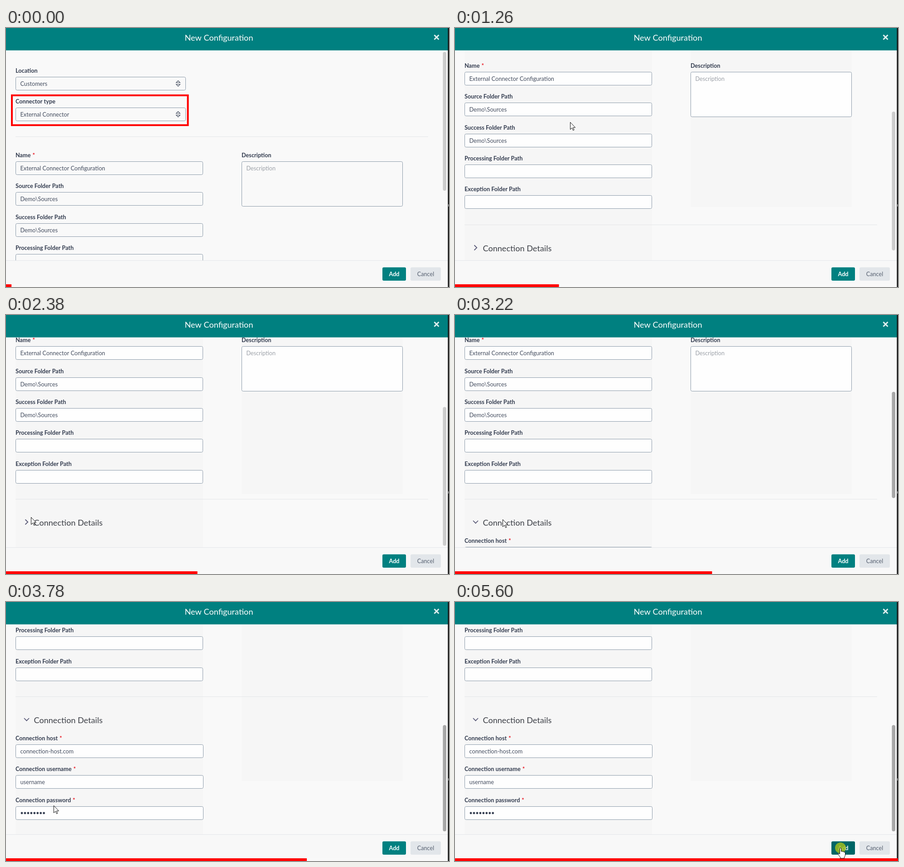
Write an HTML page with a canvas that moves like this. It is 978x573 px and loops after 5670 ms.

```html
<!DOCTYPE html>
<html lang="en">
<head>
<meta charset="utf-8">
<title>New Configuration</title>
<style>
html, body { margin: 0; width: 100%; height: 100%; overflow: hidden; background: #f9f9f9; }
canvas { display: block; }
</style>
</head>
<body>
<canvas id="stage" width="978" height="573"></canvas>
<script>
const W = 978, H = 573, STEP = 70, LOOP = 5670;
const ctx = document.getElementById('stage').getContext('2d');
const INK = '#454e60', LABEL = '#343d50', BORDER = '#8c9baa', TEAL = '#008080', RED = '#ff0000';

// Keyframes: [time, value...]
const SCROLL = [
  [840, 0], [910, 22.7], [980, 80], [1050, 99], [1120, 130], [1190, 178], [1260, 198],
  [1330, 198], [1400, 215], [1470, 225.7], [3290, 225.7], [3360, 260], [3430, 310],
  [3500, 324.3], [3570, 324.3], [3640, 345], [3710, 400], [3780, 423.5]
];
const POINTER = [
  [70, 815, 528], [140, 795, 515], [280, 620, 400], [420, 400, 275], [560, 265, 212], [630, 254, 208],
  [1820, 254, 208], [1890, 253, 214], [2030, 215, 265], [2170, 120, 380], [2310, 62, 440],
  [2380, 55, 447], [2450, 52, 455], [2800, 52, 455], [3080, 105, 452], [3500, 105, 452], [3780, 105, 450],
  [3850, 100, 452], [3990, 81, 455], [4130, 90, 450], [4270, 140, 436], [4410, 246, 424],
  [4480, 283, 420], [4550, 340, 414], [4620, 495, 404], [4690, 650, 418], [4760, 703, 424],
  [4830, 760, 449], [4900, 798, 470], [4970, 812, 487], [5040, 817, 490], [5180, 840, 532], [5320, 851, 544]
];
const OPEN = [[2590, 0], [2870, 1]];

function at(keys, t) {
  if (t <= keys[0][0]) return keys[0].slice(1);
  const i = keys.findIndex(k => k[0] >= t);
  if (i < 0) return keys[keys.length - 1].slice(1);
  const a = keys[i - 1], b = keys[i], u = (t - a[0]) / (b[0] - a[0]);
  return a.slice(1).map((v, j) => v + (b[j + 1] - v) * u);
}

function rect(x, y, w, h, color) {
  ctx.fillStyle = color;
  ctx.fillRect(x, y, w, h);
}

function rounded(x, y, w, h, r, fill, stroke) {
  ctx.beginPath();
  ctx.roundRect(x, y, w, h, r);
  ctx.fillStyle = fill;
  ctx.fill();
  if (stroke) {
    ctx.strokeStyle = stroke;
    ctx.lineWidth = 1;
    ctx.stroke();
  }
}

function text(s, x, y, color = INK, size = 12.7, weight = 400, align = 'left') {
  ctx.font = `${weight} ${size}px Lato, sans-serif`;
  ctx.textAlign = align;
  ctx.fillStyle = color;
  ctx.fillText(s, x, y);
  return ctx.measureText(s).width;
}

function line(points, color, width, closed) {
  ctx.beginPath();
  points.forEach(p => ctx.lineTo(...p));
  if (closed) ctx.closePath();
  ctx.strokeStyle = color;
  ctx.lineWidth = width;
  ctx.stroke();
}

// Label, box and value; y is the top of the box
function field(label, value, x, y, w, fill, { h = 29, required, color } = {}) {
  y = Math.round(y);
  const end = x + text(label, x, y - 9.5, LABEL, 12.7, 700);
  if (required) text('*', end + 4, y - 9.5, '#e8101c', 12.7, 700);
  rounded(x + .5, y + .5, w - 1, h, 3, fill, BORDER);
  text(value, x + 10.5, y + 19.5, color);
}

function select(label, value, y, fill) {
  field(label, value, 21, y, 376, fill);
  y = Math.round(y) + 15;
  line([[375.7, y - 2], [380, y - 6.5], [384.3, y - 2]], INK, 1.2, true);
  line([[375.7, y + 1.5], [380, y + 6], [384.3, y + 1.5]], INK, 1.2, true);
}

function drawForm(t, scroll, open) {
  const fill = t < 840 ? '#f9f9f9' : '#fefefe';
  const row = i => 295 + 68.3 * i - scroll;
  const rule = y => rect(21, Math.round(y - scroll), 911, 1, '#e4e6e8');

  select('Location', 'Customers', 108 - scroll, fill);
  select('Connector type', 'External Connector', 176.3 - scroll, fill);
  rule(240);
  const names = ['Name', 'Source Folder Path', 'Success Folder Path', 'Processing Folder Path', 'Exception Folder Path'];
  const values = ['External Connector Configuration', 'Demo\\Sources', 'Demo\\Sources', '', ''];
  names.forEach((name, i) => field(name, values[i], 21, row(i), 414, fill, { required: i === 0 }));
  field('Description', 'Description', 520, row(0), 356, fill, { h: 99, color: '#9ca1a8' });
  rule(632.5);

  const y = Math.round(683.5 - scroll);
  text('Connection Details', 61.5, y + 7.5, '#3c3f46', 18.1);
  ctx.save();
  ctx.translate(45.5, y);
  ctx.rotate(open * Math.PI / 2);
  line([[-3, -5.5], [2.7, 0], [-3, 5.5]], '#5b5b78', 1.8);
  ctx.restore();

  if (!open) return;
  ctx.save();
  ctx.beginPath();
  ctx.rect(0, 710 - scroll, W, 220 * open);
  ctx.clip();
  ['host', 'username', 'password'].forEach((name, i) =>
    field('Connection ' + name, ['connection-host.com', 'username', ''][i], 21, 738.5 + 68.3 * i - scroll, 415, fill, { required: true }));
  ctx.fillStyle = LABEL;
  for (let i = 0; i < 8; i++) {
    ctx.beginPath();
    ctx.arc(35 + 6.95 * i, Math.round(890.5 - scroll), 2.4, 0, 7);
    ctx.fill();
  }
  ctx.restore();
}

function drawPointer(x, y, hand, click) {
  if (click) {
    ctx.beginPath();
    ctx.arc(x, y, 12, 0, 7);
    ctx.fillStyle = 'rgba(158,188,32,.85)';
    ctx.fill();
  }
  ctx.save();
  ctx.translate(x, y);
  const shape = new Path2D(hand
    ? 'M-1.5 1Q0-1 1.5 1V8Q3.5 6.5 4.5 8.5Q6.5 7 7.5 9.3Q10 8.5 10.5 11V16Q10 19 8.5 20V23H-.5V20.5Q-3 18-5 13.5Q-5 10.5-1.5 13.5Z'
    : 'M.5.5V16.5L4.3 13L6.7 18.5L9 17.5L6.6 12.2H11.5Z');
  ctx.fillStyle = '#fff';
  ctx.fill(shape);
  ctx.strokeStyle = '#111';
  ctx.lineWidth = 1;
  ctx.stroke(shape);
  ctx.restore();
}

function draw(t) {
  const [scroll] = at(SCROLL, t), [open] = at(OPEN, t);
  rect(0, 0, W, H, '#f9f9f9');
  if (t >= 1050) {
    rect(21, 50, 414, 464, '#f6f6f6');
    rect(520, 50, 356, 346, '#f6f6f6');
  }

  ctx.save();
  ctx.beginPath();
  ctx.rect(0, 49, W, 465);
  ctx.clip();
  drawForm(t, scroll, open);
  ctx.restore();

  const top = 53 + scroll * (.667 - .149 * open);
  rounded(964.5, top, 7.5, 307 - 72 * open, 3.7, open ? '#a8a8a8' : '#cdcdcd');
  if (t < 700) {
    ctx.strokeStyle = RED;
    ctx.lineWidth = 4;
    ctx.strokeRect(13, 149, 388.5, 66);
  }

  rect(0, 0, W, 49.5, TEAL);
  text('New Configuration', 470, 28, '#fff', 18.15, 400, 'center');
  line([[945.5, 15.5], [955.5, 25.5]], '#e4f1f1', 2.8);
  line([[955.5, 15.5], [945.5, 25.5]], '#e4f1f1', 2.8);

  rect(0, 514, W, 53, '#f8f8f8');
  rect(0, 514, W, 1, '#e4e6e9');
  rounded(831, 529.5, 52, 29.5, 3, t >= 5180 ? '#006666' : TEAL);
  text('Add', 857, 548.5, '#fff', 12.7, 700, 'center');
  rounded(893, 529.5, 67, 29.5, 3, '#e2e6ea');
  text('Cancel', 926.5, 548.5, '#566070', 12.7, 400, 'center');
  rect(975.5, 0, 2.5, H, '#151515');
  rect(976, 390, 2, 5, '#777');

  rect(0, 567, W * (t + STEP) / LOOP, 6, RED);
  if (t >= STEP) {
    const onToggle = t >= 2450 && t < 2870;
    drawPointer(...at(POINTER, t), onToggle || t >= 5180, (t >= 2520 && t < 2730) || t >= 5460);
  }
}

function tick() {
  draw(Math.floor(performance.now() % LOOP / STEP) * STEP);
  requestAnimationFrame(tick);
}
tick();
</script>
</body>
</html>
```
